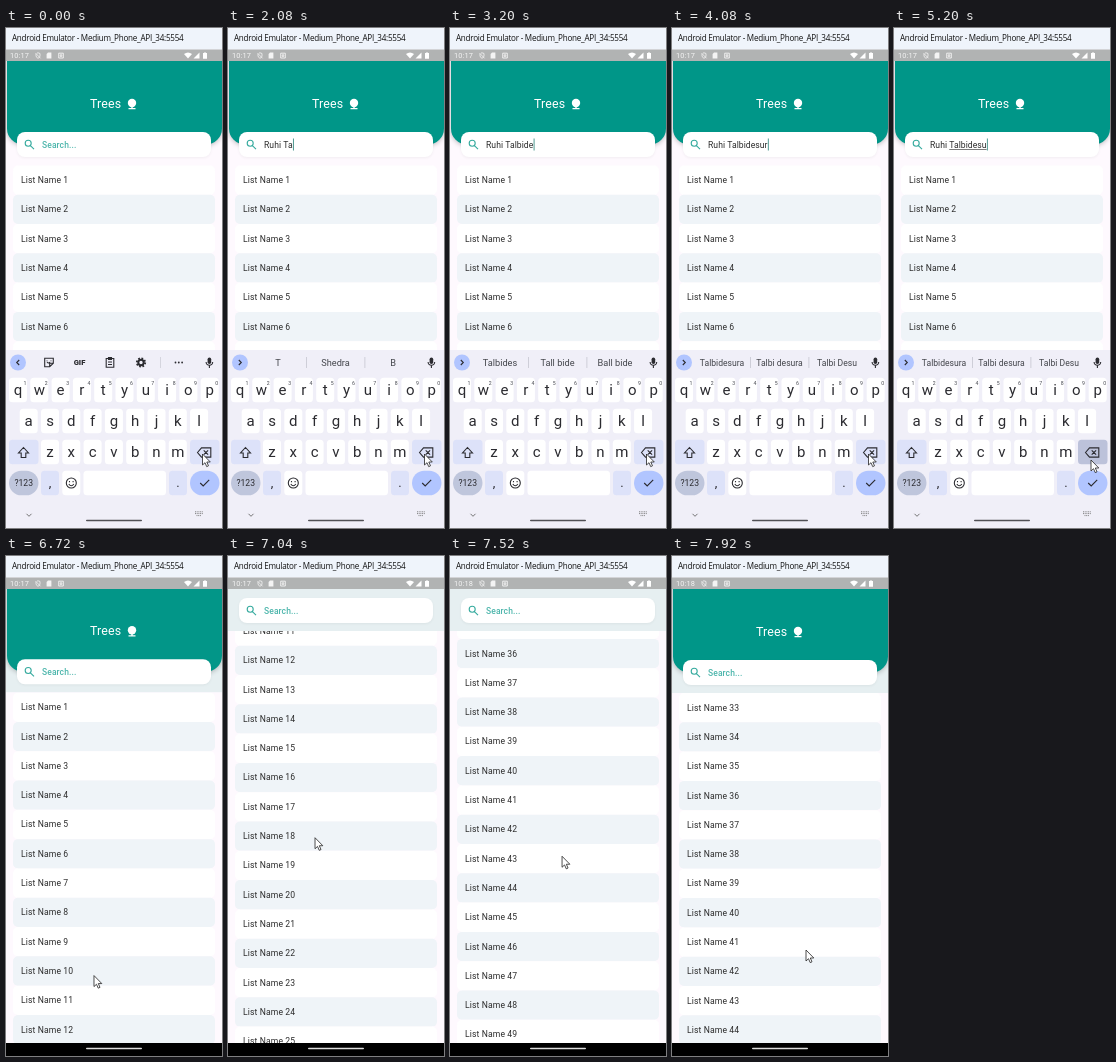
An HTML page with a canvas that plays this animation: 216x500 px, repeating every 8 s.

```html
<!DOCTYPE html>
<html lang="en">
<head>
<meta charset="utf-8">
<title>List search</title>
<style>
html, body { margin: 0; width: 100%; height: 100%; overflow: hidden; background: #fff; }
canvas { display: block; width: 216px; height: 500px; }
</style>
</head>
<body>
<canvas id="stage"></canvas>
<script>
const W = 216, H = 500, LOOP = 8000;
const TEAL = '#009688', INK = '#2b2b30', KEY = '#dde2f9', ACCENT = '#b1c5ff', BOARD = '#f0eff8', PAGE = '#fef9fe';
const canvas = document.getElementById('stage');
const ctx = canvas.getContext('2d');
const dpr = window.devicePixelRatio || 1;
canvas.width = W * dpr;
canvas.height = H * dpr;

const QUERY = 'Ruhi Talbidesura';
const TYPED_AT = [880, 960, 1040, 1120, 1280, 1840, 2080, 2240, 2400, 2560, 2880, 3200, 3520, 4000, 4080, 4160];
const SUGGESTIONS = [
  [13, 'Talbidesura', 'Talbi desura', 'Talbi Desu'],
  [12, 'Talbides', 'Tall bide', 'Ball bide'],
  [8, 'Tal', 'Tall', 'Talk'],
  [6, 'T', 'Shedra', 'B'],
  [5, 'is', 'and', 'the'],
  [1, 'Ru', 'Ruhi', 'Run']
];
const POINTER = [[0, 196.5, 426], [4480, 196.5, 426], [4640, 203, 462], [4880, 197, 432], [5840, 197, 432],
  [6160, 33, 484], [6400, 33, 484], [6720, 88, 420], [7040, 87, 282], [7160, 90, 250], [7520, 112, 300], [7920, 134, 394]];
const SCROLL = [[6720, 0], [6920, 150], [7040, 368], [7280, 850], [7480, 1080], [7560, 1080], [7900, 938]];

const clamp = v => Math.max(0, Math.min(1, v));
const within = (t, a, b) => t >= a && t < b;

function track(points, t) {
  const next = points.findIndex(p => p[0] > t);
  if (next === 0) return points[0].slice(1);
  if (next < 0) return points[points.length - 1].slice(1);
  const a = points[next - 1], b = points[next];
  const k = (t - a[0]) / (b[0] - a[0]);
  return a.slice(1).map((v, i) => v + (b[i + 1] - v) * k);
}

function box(x, y, w, h, r, fill) {
  ctx.beginPath();
  ctx.roundRect(x, y, w, h, r);
  ctx.fillStyle = fill;
  ctx.fill();
}

function disc(x, y, r, fill) {
  box(x - r, y - r, 2 * r, 2 * r, r, fill);
}

function text(str, x, y, size, color, { align = 'left', weight = 400, spacing = 0, family = 'Roboto' } = {}) {
  ctx.font = `${weight} ${size}px ${family}, sans-serif`;
  ctx.letterSpacing = spacing + 'px';
  ctx.textAlign = align;
  ctx.fillStyle = color;
  ctx.fillText(str, x, y);
}

// Draws an SVG path around (x, y), stroked or filled.
function icon(d, x, y, color, line = 1.1) {
  ctx.save();
  ctx.translate(x, y);
  const path = new Path2D(d);
  if (line) {
    ctx.strokeStyle = color;
    ctx.lineWidth = line;
    ctx.stroke(path);
  } else {
    ctx.fillStyle = color;
    ctx.fill(path);
  }
  ctx.restore();
}

function shadow(color, blur, dy) {
  ctx.shadowColor = color;
  ctx.shadowBlur = blur * dpr;
  ctx.shadowOffsetY = dy * dpr;
}

function drawList(scroll, top) {
  ctx.save();
  ctx.beginPath();
  ctx.rect(0, top, W, 487 - top);
  ctx.clip();
  for (let i = 1; i <= 50; i++) {
    const y = 152 + (i - 1) * 29.3 - scroll;
    if (y < 30 || y > 510) continue;
    box(7, y - 14.6, 202, 29.3, 5, i % 2 ? '#fff' : '#eff4f8');
    text('List Name ' + i, 15, y + 3, 8.6, '#2c2c2c', { spacing: 0.12 });
  }
  ctx.restore();
}

function drawHeader(t, fold, scrolled, count) {
  const lift = 62 * fold;
  ctx.save();
  ctx.beginPath();
  ctx.rect(0, 33, W, 104 - lift);
  ctx.clip();
  ctx.fillStyle = scrolled ? '#e6eff1' : PAGE;
  ctx.fillRect(0, 33, W, 104);
  ctx.globalAlpha = 1 - fold;
  ctx.save();
  shadow('rgba(0,0,0,.25)', 5, 1);
  box(1, 10 - lift, W - 1, 106.5, [0, 0, 16, 16], TEAL);
  ctx.restore();
  text('Trees', 84, 80 - lift, 12.4, '#fff', { spacing: 0.15 });
  disc(126, 75 - lift, 4.2, '#fff');
  icon('M-.7 0h1.4v4.4h2.8v1.3h-7v-1.3h2.8z', 126, 75.5 - lift, '#fff', 0);
  ctx.restore();

  const y = 104 - lift;
  ctx.save();
  shadow('rgba(0,0,0,.05)', 3, 1);
  box(11, y, 194, 25, 8, '#fff');
  ctx.restore();
  icon('M2.2 -1.2a3 3 0 1 1 -6 0a3 3 0 1 1 6 0M1.4 1.1L5 4.7', 23, y + 12.5, '#35aa9e', 1.1);

  const style = { spacing: 0.05 };
  const typed = QUERY.slice(0, count);
  if (count) text(typed, 36, y + 16, 8.6, '#2c2c2c', style);
  else text('Search...', 36, y + 16, 8.5, '#4db6ac', { weight: 500, spacing: 0.1 });
  const end = count ? 36 + ctx.measureText(typed).width : 36;
  if (t >= 5200 && count > 5) {
    const start = 36 + ctx.measureText(QUERY.slice(0, 5)).width;
    ctx.fillStyle = '#444';
    ctx.fillRect(start, y + 17.2, end - start, 0.7);
  }
  const hidden = within(t, 1680, 1840) || within(t, 4400, 4720) || within(t, 5040, 5200);
  if (count ? !hidden : within(t, 320, 640)) {
    ctx.fillStyle = '#3d8f86';
    ctx.fillRect(end + 0.3, y + 6.5, 0.9, 12);
  }
}

function drawBars(t) {
  ctx.fillStyle = '#eff4fb';
  ctx.fillRect(0, 0, W, 21.5);
  text('Android Emulator - Medium_Phone_API_34:5554', 6, 13, 8.1, '#111', { family: '"Open Sans"', spacing: -0.25 });
  ctx.fillStyle = '#b1b3b3';
  ctx.fillRect(0, 21.5, W, 11.5);
  text(t < 7400 ? '10:17' : '10:18', 4, 30.2, 7.4, '#f4f4f4', { spacing: 0.1 });
  icon('M-2.5 -2.5L2.5 2.8M-2 -1.6v2q.4 1.8 2 2.4q1.6 -.6 2 -2.2v-2.6l-2 -.7l-1 .3', 32, 27.5, '#f4f4f4', 0.8);
  icon('M-1 -3h3.4v6h-4.8v-4.4z', 43, 27.5, '#f4f4f4', 0);
  icon('M-2.3 -2.3h4.6v4.8h-4.6zM-.8 -.7h1.6v1.6h-1.6z', 55, 27.5, '#f4f4f4', 0.9);
  icon('M-4 -1.5q4 -3 8 0L0 3z', 182, 27.5, '#fff', 0);
  icon('M3 -3v6h-6z', 190.5, 27.5, '#fff', 0);
  icon('M-1 -3h2v.6h1v5.6h-4v-5.6h1z', 199, 27.5, '#fff', 0);
}

function drawToolbar(t, count) {
  const open = t < 880;
  disc(12, 334.5, 8, ACCENT);
  icon(open ? 'M1.2 -2.5L-1.3 0L1.2 2.5' : 'M-1.2 -2.5L1.3 0L-1.2 2.5', 12, 334.5, INK);
  box(201.6, 329.5, 3.6, 6.5, 1.8, INK);
  icon('M-3.3 -.5a3.3 3.3 0 0 0 6.6 0M0 3v2.5', 203.4, 334.5, INK);
  if (open) {
    icon('M-4.3 -4.3h8.6v5l-3.6 3.6h-5zM.7 4.3v-3.6h3.6M-2 -.5q1.5 2 3 0M-2 -2v.8M2 -2v.8', 43, 334.5, INK);
    text('GIF', 73.5, 337.2, 7.6, INK, { align: 'center', weight: 800 });
    icon('M-3.8 -4h7.6v8.8h-7.6zM-1.5 -5v2h3v-2zM-2 -.5h4M-2 2h4', 104, 334.5, INK);
    ctx.save();
    ctx.setLineDash([1.7, 1.55]);
    icon('M4.15 0a4.15 4.15 0 1 1 -8.3 0a4.15 4.15 0 1 1 8.3 0', 135, 334.5, INK, 1.9);
    ctx.restore();
    icon('M2.7 0a2.7 2.7 0 1 1 -5.4 0a2.7 2.7 0 1 1 5.4 0', 135, 334.5, INK, 2);
    ctx.fillStyle = '#cfcfd8';
    ctx.fillRect(154, 329, 0.8, 11);
    for (const x of [169.5, 172.8, 176.1]) disc(x, 334.5, 0.9, INK);
    return;
  }
  const row = SUGGESTIONS.find(s => count >= s[0]);
  if (!row) return;
  const size = row[0] === 13 ? 8.6 : 9.2;
  row.slice(1).forEach((word, i) => text(word, 50 + i * 57.5, 338, size, '#44464c', { align: 'center' }));
  ctx.fillStyle = '#c6c6d0';
  for (const x of [78, 136.5]) ctx.fillRect(x, 329, 0.8, 11);
}

function drawKeyboard(t, count, drop) {
  ctx.save();
  ctx.translate(0, drop);
  ctx.fillStyle = BOARD;
  ctx.fillRect(0, 322, W, 178);
  drawToolbar(t, count);

  const rows = [['qwertyuiop', 12, 362], ['asdfghjkl', 22.7, 393], ['zxcvbnm', 44, 424]];
  for (const [letters, x0, y] of rows) {
    [...letters].forEach((letter, i) => {
      const x = x0 + i * 21.3;
      box(x - 9, y - 12.3, 18, 24.6, 3.5, '#fff');
      text(letter, x, y + 5, 15, INK, { align: 'center' });
      if (y === 362) text((i + 1) % 10, x + 7, y - 5, 5.2, '#44464f', { align: 'center' });
    });
  }
  box(3, 411.7, 29.5, 24.6, 3.5, KEY);
  icon('M0 -5L5 0.5H2.3V5H-2.3V0.5H-5z', 17.5, 424.5, INK);
  box(184, 411.7, 29.5, 24.6, 3.5, within(t, 5120, 5840) ? '#bcc2da' : KEY);
  icon('M-7 0L-3 -4.6H6.3V4.6H-3zM-.8 -2.2L3.6 2.2M3.6 -2.2L-.8 2.2', 198.5, 424.5, INK);

  box(3, 442.7, 29.5, 24.6, 12.3, '#bfc6dc');
  text('?123', 17.7, 458.2, 8.6, INK, { align: 'center' });
  box(35, 442.7, 18, 24.6, 3.5, KEY);
  text(',', 44, 459, 13, INK, { align: 'center' });
  box(56.3, 442.7, 18, 24.6, 3.5, '#fff');
  icon('M5 0a5 5 0 1 1 -10 0a5 5 0 1 1 10 0M-2.5 1q2.5 3.6 5 0M-1.8 -2v1.2M1.8 -2v1.2', 65.3, 455, INK);
  box(77.5, 442.7, 82.5, 24.6, 3.5, '#fff');
  box(163, 442.7, 18, 24.6, 3.5, KEY);
  text('.', 172, 459, 13, INK, { align: 'center' });
  box(184, 442.7, 29.5, 24.6, 12.3, ACCENT);
  icon('M-4.5 0L-1.5 3L4.5 -3.2', 198.7, 455, INK);

  if (within(t, 6200, 6640)) box(0, 474, 46, 25, 12.5, '#d9d8df');
  icon('M-2.5 -1.2L0 1.3L2.5 -1.2', 23, 487, '#666', 0.9);
  ctx.save();
  ctx.setLineDash([1, 0.7]);
  icon('M-4 -2.2h8M-4 -.4h8M-2.5 1.6h5', 193, 486, '#777', 0.9);
  ctx.restore();
  box(80, 491.7, 56, 1.6, 0.8, '#505055');
  ctx.restore();
}

function drawPointer(t) {
  const [x, y] = track(POINTER, t);
  const arrow = 'M0 0V11L2.5 8.7L4.2 12.6L6 11.8L4.3 8H7.8z';
  icon(arrow, x, y, '#fff', 0);
  icon(arrow, x, y, '#222', 0.8);
}

function draw(t) {
  ctx.setTransform(dpr, 0, 0, dpr, 0, 0);
  ctx.fillStyle = PAGE;
  ctx.fillRect(0, 0, W, H);
  const erased = t < 5200 ? 0 : 2 + Math.floor((t - 5200) / 45);
  const count = Math.max(0, TYPED_AT.filter(at => t >= at).length - erased);
  const [scroll] = track(SCROLL, t);
  const fold = t < 7560 ? clamp(scroll / 62) : clamp((7800 - t) / 200);

  drawList(scroll, 137 - 62 * fold);
  drawHeader(t, fold, scroll > 0, count);
  drawBars(t);
  ctx.fillStyle = '#000';
  ctx.fillRect(0, 487, W, 13);
  box(80, 491.7, 56, 1.6, 0.8, '#ddd');
  const slide = clamp((t - 6400) / 240);
  if (slide < 1) drawKeyboard(t, count, 178 * slide * slide);
  drawPointer(t);
}

const start = performance.now();
function tick() {
  draw((performance.now() - start) % LOOP);
  requestAnimationFrame(tick);
}
tick();
</script>
</body>
</html>
```
